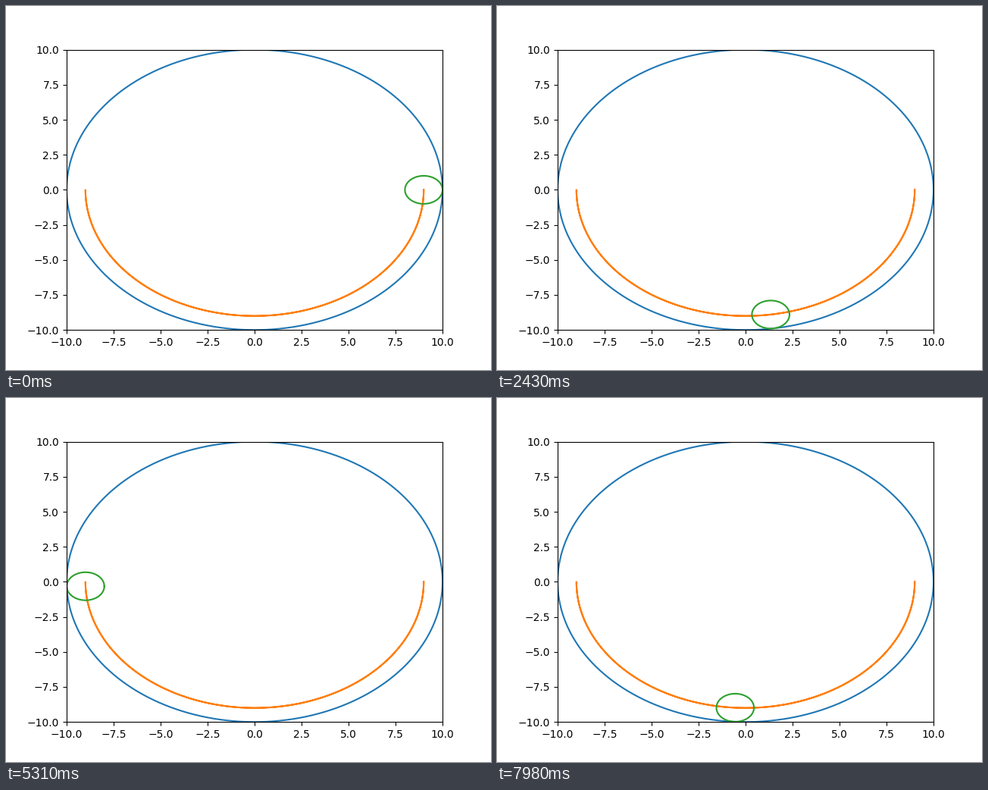
These frames come from a looping animation (640x480 px, 8 s). A matplotlib script:

```python
import numpy as np
import matplotlib.pyplot as plt
from matplotlib.animation import FuncAnimation

LOOP_MS = 8000
FRAMES = 267
R_BIG, R_SMALL = 10, 1
R_PATH = R_BIG - R_SMALL


def circle(radius, angle):
    return radius * np.cos(angle), radius * np.sin(angle)


# The small circle swings along the lower half and back, resting one step at the turn.
swing = -np.linspace(0, np.pi, 180)
path_x, path_y = circle(R_PATH, np.concatenate([swing, swing[::-1]]))

turn = np.linspace(0, 2 * np.pi, 180)
ring_x, ring_y = circle(R_SMALL, turn)

fig, ax = plt.subplots(figsize=(6.4, 4.8), dpi=100)
ax.set_xlim(-R_BIG, R_BIG)
ax.set_ylim(-R_BIG, R_BIG)

ax.plot(*circle(R_BIG, turn), color="tab:blue")
ax.plot(path_x, path_y, color="tab:orange")
ring, = ax.plot([], [], color="tab:green")


def update(i):
    ring.set_data(path_x[i] + ring_x, path_y[i] + ring_y)
    return ring,


ani = FuncAnimation(fig, update, frames=FRAMES, interval=LOOP_MS / FRAMES,
                    repeat=True, repeat_delay=0)
plt.show()
```
